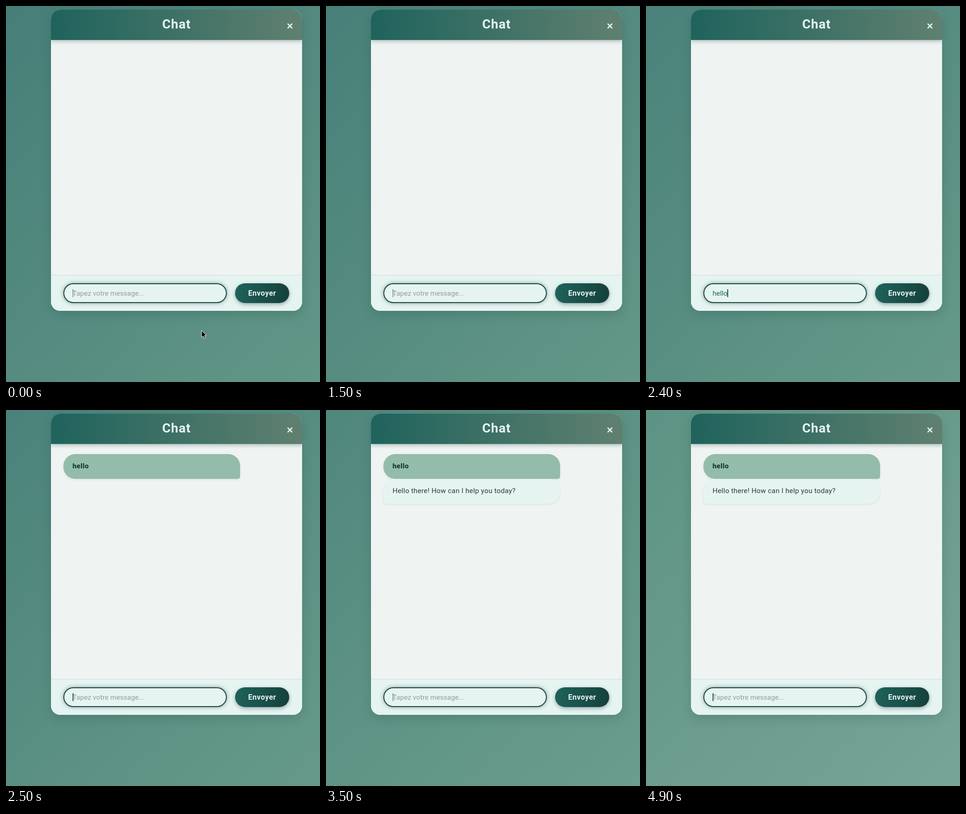
An HTML page for the animation above (5 s loop, 684 by 819 pixels).

```html
<!DOCTYPE html>
<html lang="fr">
<head>
<meta charset="utf-8">
<title>Chat</title>
<style>
html, body { margin: 0; width: 100%; height: 100%; overflow: hidden; }
body { position: relative; font-family: Roboto, sans-serif; }
body * { position: absolute; box-sizing: border-box; white-space: pre; }
#bg { inset: 0; width: 684px; height: 819px; }
#panel {
  left: 98px; top: 8px; width: 547px; height: 656px; border-radius: 20px;
  background: #e6f4f1; overflow: hidden; box-shadow: 0 8px 22px rgba(20, 65, 58, .2);
}
#list { left: 0; top: 66px; width: 547px; height: 512px; background: #eff3f2; border-radius: 0 0 16px 16px; }
#head {
  left: 0; top: 0; width: 547px; height: 66px; color: #e6f4f1;
  background: linear-gradient(90deg, #1f635c, #5f8070);
  box-shadow: 0 3px 8px rgba(20, 65, 58, .3);
}
#title { left: 0; width: 547px; top: 0; text-align: center; font: 700 28px/64px Roboto, sans-serif; letter-spacing: 1px; }
#close { left: 514px; top: 29px; }
#form { left: 0; top: 578px; width: 547px; height: 78px; background: #e6f4f1; border-top: 1px solid #cbdedb; }
#input {
  left: 125px; top: 604px; width: 356px; height: 43px; border: 2px solid #17463f;
  border-radius: 22px; background: #e6f4f1; box-shadow: 0 0 8px rgba(22, 63, 58, .5);
}
#text { left: 145px; top: 615px; font-size: 15.2px; line-height: 22px; }
#caret { top: 617px; width: 1.5px; height: 17px; background: #17564e; }
#send {
  left: 499px; top: 604px; width: 118px; height: 43px; border-radius: 22px; color: #e6f4f1;
  background: linear-gradient(100deg, #1f635c, #163f3a); box-shadow: 0 3px 9px rgba(22, 63, 58, .4);
  font: 700 16px/43px Roboto, sans-serif; letter-spacing: .5px; text-align: center;
}
.msg {
  left: 125px; width: 385px; height: 54px; padding-left: 20px;
  font-size: 15.2px; line-height: 53px; letter-spacing: .3px;
}
#mine {
  top: 96px; background: #94bcab; color: #163f3a; font-weight: 900;
  border-radius: 26px 26px 5px 26px; box-shadow: 0 2px 5px rgba(22, 63, 58, .08);
}
#reply {
  top: 150px; background: #e6f4f1; color: #2b3b39;
  border-radius: 26px 26px 26px 5px; box-shadow: 0 2px 5px rgba(22, 63, 58, .08);
}
.pointer { left: 0; top: 0; overflow: visible; }
</style>
</head>
<body>
<div id="bg"></div>
<div id="panel">
  <div id="list"></div>
  <div id="head">
    <div id="title">Chat</div>
    <svg id="close" width="13" height="13"><path d="M1.5 1.5l10 10M11.5 1.5l-10 10" stroke="#e6f4f1" stroke-width="2.5"/></svg>
  </div>
  <div id="form"></div>
</div>
<div id="mine" class="msg">hello</div>
<div id="reply" class="msg">Hello there! How can I help you today?</div>
<div id="input"></div>
<div id="text"></div>
<div id="caret"></div>
<div id="send">Envoyer</div>
<svg id="arrow" class="pointer" width="14" height="20"><path d="M0 0V15L3.5 12L6 17.5L8.5 16.4L6.1 11H10.7Z" fill="#000" stroke="#fff" stroke-width="1"/></svg>
<svg id="beam" class="pointer" width="9" height="17">
  <g fill="none">
    <path d="M-3.5 -7.5Q0 -7.5 0 -5V5Q0 7.5 -3.5 7.5M3.5 -7.5Q0 -7.5 0 -5V5Q0 7.5 3.5 7.5M-2 1H2" stroke="#fff" stroke-width="2.6"/>
    <path d="M-3.5 -7.5Q0 -7.5 0 -5V5Q0 7.5 -3.5 7.5M3.5 -7.5Q0 -7.5 0 -5V5Q0 7.5 3.5 7.5M-2 1H2" stroke="#111" stroke-width="1.2"/>
  </g>
</svg>
<script>
const LOOP = 5000, WORD = 'hello', KEYS = [1600, 1800, 2000, 2100, 2300];
const SENT = 2500, REPLY = 3000, CLICK = 500, HIDE = 1000;
const STOPS = [[70, 127, 120], [98, 150, 135], [124, 168, 156]];
const $ = id => document.getElementById(id);
const show = (id, on) => { $(id).style.visibility = on ? 'visible' : 'hidden'; };
const clamp = v => Math.max(0, Math.min(1, v));

function tone(s) {
  const i = s < 1 ? 0 : 1, k = s - i;
  return `rgb(${STOPS[i].map((c, j) => (c + (STOPS[i + 1][j] - c) * k).toFixed(1))})`;
}

function drawBackground(t) {
  const shift = .82 * Math.pow(t / 4900, 2.5);
  const mid = (1 - shift) * 100;
  $('bg').style.background =
    `linear-gradient(135deg, ${tone(shift)}, ${tone(1)} ${mid}%, ${tone(1 + shift)})`;
}

// Half visible at the turn, then on, fading out and off
function blink(age) {
  const p = (age % 1000 + 1000) % 1000;
  return p < 500 ? clamp(.5 + p / 150) : p < 900 ? clamp(1 - (p - 500) / 120) : clamp((p - 920) / 160);
}

function drawInput(t) {
  const typed = t < SENT ? KEYS.filter(k => t >= k).length : 0;
  const el = $('text');
  el.textContent = typed ? WORD.slice(0, typed) : 'Tapez votre message...';
  el.style.color = typed ? '#1f635c' : '#949d9a';
  $('caret').style.left = (typed ? 145 + el.getBoundingClientRect().width : 145) + 'px';
  const start = [...KEYS, CLICK, SENT].filter(k => k <= t).reduce((a, b) => Math.max(a, b), 0);
  const age = t - start;
  $('caret').style.opacity = start && age < 500 ? 1 : blink(age);
}

function drawPointer(t) {
  const k = clamp(t / 500), e = k * k * (3 - 2 * k);
  const x = 426 - 77 * e, y = 707 - 63 * e;
  const inside = y < 647;
  show('arrow', t < HIDE && !inside);
  show('beam', t < HIDE && inside);
  $('arrow').style.transform = $('beam').style.transform = `translate(${x}px, ${y}px)`;
}

function frame(now) {
  const t = now % LOOP;
  drawBackground(t);
  drawInput(t);
  drawPointer(t);
  show('mine', t >= SENT);
  show('reply', t >= REPLY);
  requestAnimationFrame(frame);
}
requestAnimationFrame(frame);
</script>
</body>
</html>
```
